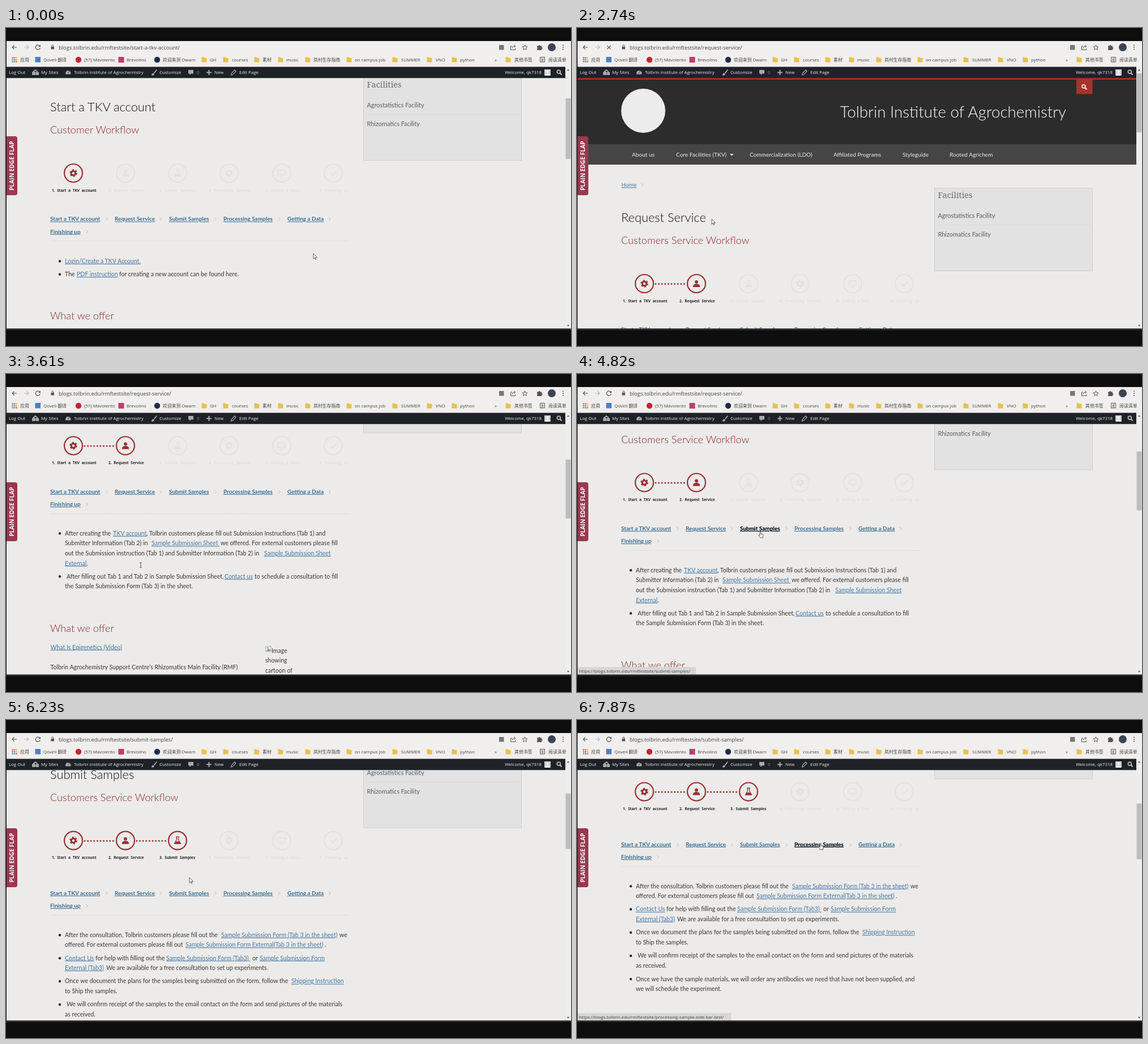
An HTML page for the animation above (8000 ms loop, 998 by 561 pixels).

```html
<!DOCTYPE html>
<html lang="en">
<head>
<meta charset="utf-8">
<title>Customer workflow</title>
<style>
@property --s { syntax: "<number>"; inherits: true; initial-value: 195; }
html, body { margin: 0; width: 100%; height: 100%; overflow: hidden; background: #0e0e0e; }
svg { display: block; width: 100vw; height: 100vh; animation: scroll 8s linear infinite; }
text { white-space: pre; font: 10.56px Lato, sans-serif; fill: #383838; }
.scroll { transform: translateY(calc(var(--s) * -1px)); }
.thumb { fill: #bdbdbd; transform: translateY(calc(var(--s) * var(--k) * 1px)); }
.title { font-size: 21.8px; font-weight: 300; fill: #111; }
.sub { font-size: 18.1px; font-weight: 300; fill: #8f2228; }
.link { fill: #4677a4; text-decoration: underline; text-decoration-thickness: .8px; }
.step { font-size: 10px; font-weight: 700; fill: #3a6c93; text-decoration: underline; }
.hover { fill: #111; }
.tiny { font: 700 6.5px "Open Sans", sans-serif; word-spacing: 2px; fill: #222; }
.serif { font: 14.5px "Noto Serif", serif; fill: #6c6c6c; }
.side { font-size: 10.9px; fill: #5c5c5c; }
.brand { font-size: 27.8px; font-weight: 300; fill: #fff; text-anchor: end; }
.nav { font-size: 10.1px; fill: #ececec; }
.crumb { font-size: 10px; }
.ui { font: 7.9px "Open Sans", "Noto Sans CJK SC", sans-serif; fill: #444; }
.url { font-size: 9.4px; }
.bar { fill: #ececec; }
.count { fill: #8d9194; }
.end { text-anchor: end; }
.tab { font: 700 10.2px "Open Sans", sans-serif; fill: #fff; text-anchor: middle; }
.line { fill: none; stroke: #555; stroke-width: 1.2; }
.red { fill: none; stroke: #982f33; }
#cursor { animation: move 8s ease-in-out infinite; }
@keyframes scroll {
  0% { --s: 195; animation-timing-function: step-end; }
  30.5% { --s: 0; }
  36.75% { --s: 0; }
  42.625%, 46.75% { --s: 324.5; }
  50.125% { --s: 259.5; animation-timing-function: step-end; }
  75.375% { --s: 0; animation-timing-function: step-end; }
  77.875% { --s: 238; }
  80.375% { --s: 305; }
  81.625%, 100% { --s: 324.5; }
}
@keyframes move {
  0%, 5% { transform: translate(543px, 398px); }
  15.125%, 50.125% { transform: translate(238px, 337px); }
  57.625%, 82.875% { transform: translate(324px, 278px); }
  91.75%, 100% { transform: translate(430px, 218px); }
}
</style>
</head>
<body>
<script>
const LOOP = 8000;
const css = [];

// Content visible only during the given [from, to] spans, in ms.
function during(spans, content) {
  const name = 'v' + css.length;
  const keys = spans.map(([a, b]) =>
    `${a * 100 / LOOP}%{opacity:1}` + (b < LOOP ? `${b * 100 / LOOP}%{opacity:0}` : '')).join('');
  const first = spans[0][0] ? '0%{opacity:0}' : '';
  const last = spans.at(-1)[1] < LOOP ? 0 : 1;
  css.push(`@keyframes ${name}{${first}${keys}100%{opacity:${last}}}`);
  return `<g style="animation:${name} ${LOOP}ms step-end infinite">${content}</g>`;
}

const text = (x, y, str, cls = '') => `<text x="${x}" y="${y}" class="${cls}">${str}</text>`;
const rect = (x, y, w, h, fill, more = '') =>
  `<rect x="${x}" y="${y}" width="${w}" height="${h}" fill="${fill}" ${more}/>`;
const dot = (x, y, r, fill) => `<circle cx="${x}" cy="${y}" r="${r}" fill="${fill}"/>`;
const path = (d, more = 'class="line"') => `<path d="${d}" ${more}/>`;
const thin = 'class="line" style="stroke-width:1"';
const at = (x, y, content) => `<g transform="translate(${x} ${y})">${content}</g>`;

// A line is a run of [x, string] pieces; a leading underscore marks a link.
const line = (y, ...runs) => runs.map(([x, s]) =>
  s[0] === '_' ? text(x, y, s.slice(1), 'link') : text(x, y, s)).join('');
const bullet = (y, ...runs) => dot(95, y - 3.4, 2.2, '#222') + line(y, ...runs);
const chevron = (x, y) => path(`M${x - 1.5} ${y - 3}l3 3l-3 3`, 'fill="none" stroke="#b5b5b5"');

const gear = '<circle r="3.7" class="red" stroke-width="3"/>' +
  '<circle r="5.6" class="red" stroke-width="2.4" stroke-dasharray="2.9 2.964"/>';
const person = dot(0, -3, 2.9, '#982f33') +
  path('M-6 6v-1.5c0-3 3-4 6-4s6 1 6 4V6z', 'fill="#982f33"');
const flask = path('M-3-6.5h6M-1.6-6.5v5L-5.5 5.5h11L1.6-1.5v-5', 'class="red" stroke-width="1.3"') +
  path('M-3.2 1.5h6.4l2.3 4h-11z', 'fill="#982f33"');
const screen = path('M-6-5h12v8h-12zM-3 6h6', 'class="red" stroke-width="1.5"');
const check = path('M-5 0l4 4l7-8', 'class="red" stroke-width="2"');

const STEPS = [
  [119, 81, '1. Start a TKV account', gear],
  [211, 181, '2. Request Service', person],
  [303, 271, '3. Submit Samples', flask],
  [394, 358, '4. Processing Samples', gear],
  [487, 458, '5. Getting a Data', screen],
  [578, 554, '6. Finishing up', check]
];

const workflow = done => STEPS.map(([cx, lx, label, icon], i) => {
  const ring = at(cx, 451, '<circle r="16" class="red" stroke-width="2.2"/>' + icon) +
    text(lx, 483.5, label, 'tiny');
  if (i >= done) return `<g opacity=".05" style="filter:grayscale(1)">${ring}</g>`;
  return ring + (i ? path(`M${cx - 72} 451.5h52`,
    'class="red" stroke-width="3" stroke-linecap="round" stroke-dasharray="0 5.6"') : '');
}).join('');

const LINKS = [[78, 'Start a TKV account'], [192, 'Request Service'], [288, 'Submit Samples'],
  [384, 'Processing Samples'], [497, 'Getting a Data']];

function steps(y, hot, span) {
  const row = LINKS.map(([x, s], i) => text(x, y, s, 'step') +
    (i === hot ? during([span], text(x, y, s, 'step hover')) : '')).join('');
  return row + [178, 273.5, 370, 483, 571.5].map(x => chevron(x, y - 3)).join('') +
    text(78, y + 22.2, 'Finishing up', 'step') + chevron(143, y + 19) +
    path(`M79 ${y + 35.5}H606`, 'stroke="#d0d0d0" stroke-dasharray="1 1"');
}

const header = rect(0, 88, 988, 117, '#2c2c2c') + rect(0, 205, 988, 36, '#454545') +
  rect(0, 88, 988, 3, '#a8322c') + rect(882, 91, 28.5, 25.5, '#a4342b') +
  path('M897.5 105.5l3 3', 'stroke="#fff" stroke-width="1.8"') +
  '<circle cx="895" cy="103" r="3" fill="none" stroke="#fff" stroke-width="1.5"/>' +
  dot(117, 146, 39, '#ececec') +
  text(864, 158, 'Tolbrin Institute of Agrochemistry', 'brand') +
  [[97, 'About us'], [175, 'Core Facilities (TKV)'], [305, 'Commercialization (LDO)'],
    [453, 'Affiliated Programs'], [575, 'Styleguide'], [658, 'Rooted Agrichem']]
    .map(([x, s]) => text(x, 227, s, 'nav')).join('') +
  path('M270 222h6.5l-3.25 3.6z', 'fill="#fff"') +
  text(78.5, 280.3, 'Home', 'link crumb') + chevron(115, 277);

const sidebar = rect(631.5, 282.5, 279, 146, '#e3e2e2', 'stroke="#cfcecf"') +
  text(637.5, 300, 'Facilities', 'serif') +
  text(637.5, 335, 'Agrostatistics Facility', 'side') +
  path('M638 347.5H905', 'stroke="#cbcbcb" stroke-dasharray="1 1"') +
  text(637.5, 368, 'Rhizomatics Facility', 'side');

function page(span, title, sub, done, linkY, hot, hotSpan, body, k, thumb) {
  return during([span], '<g class="scroll">' + header + sidebar +
    text(78, 342, title, 'title') + text(78, 381, sub, 'sub') + workflow(done) +
    steps(linkY, hot, hotSpan) + body + '</g>' +
    rect(988, 68, 10, 463, '#eeeeed') +
    `<rect class="thumb" x="988.5" y="80" width="9" height="${thumb}" style="--k:${k}"/>`);
}

const start =
  bullet(609.8, [104, '_Login/Create a TKV Account.']) +
  bullet(633, [104, 'The '], [125, '_PDF instruction'], [200, 'for creating a new account can be found here.']) +
  text(78, 709, 'What we offer', 'sub');

const request =
  bullet(609.2, [104, 'After creating the'], [189, '_TKV account'],
    [248, ', Tolbrin customers please fill out Submission Instructions (Tab 1) and']) +
  line(626.8, [104, 'Submitter Information (Tab 2) in'], [257, '_Sample Submission Sheet '],
    [379, 'we offered. For external customers please fill']) +
  line(644.4, [104, 'out the Submission instruction (Tab 1) and Submitter Information (Tab 2) in'],
    [456, '_Sample Submission Sheet']) +
  line(662, [104, '_External'], [142, '.']) +
  bullet(685.2, [107, 'After filling out Tab 1 and Tab 2 in Sample Submission Sheet,'],
    [386, '_Contact us'], [439, 'to schedule a consultation to fill']) +
  line(702.8, [104, 'the Sample Submission Form (Tab 3) in the sheet.']) +
  text(78, 779.5, 'What we offer', 'sub') +
  line(810, [78.5, '_What Is Epigenetics (Video)']) +
  line(845, [78.5, 'Tolbrin Agrochemistry Support Centre’s Rhizomatics Main Facility (RMF)']) +
  rect(459, 805, 9, 9, '#f5f5f5', 'stroke="#999" stroke-width=".8"') +
  path('M460 813l3-4l2 2l2-1v3z', 'fill="#5b9a5b"') + dot(462, 807.5, 1.2, '#6f9fd0') +
  line(816.2, [469, 'Image']) + line(833.8, [458, 'showing']) + line(851.2, [458, 'cartoon of']);

const submit =
  bullet(621.2, [104, 'After the consultation, Tolbrin customers please fill out the'],
    [380, '_Sample Submission Form (Tab 3 in the sheet)'], [589, 'we']) +
  line(638.6, [104, 'offered. For external customers please fill out'],
    [317, '_Sample Submission Form External(Tab 3 in the sheet)'], [563, '.']) +
  bullet(661.9, [104, '_Contact Us'], [158, 'for help with filling out the'],
    [283, '_Sample Submission Form (Tab3) '], [435, 'or'], [448, '_Sample Submission Form']) +
  line(679.3, [104, '_External (Tab3)'], [177, 'We are available for a free consultation to set up experiments.']) +
  bullet(702.8, [104, 'Once we document the plans for the samples being submitted on the form, follow the'],
    [504, '_Shipping Instruction']) +
  line(720.2, [104, 'to Ship the samples.']) +
  bullet(743.8, [107, 'We will confirm receipt of the samples to the email contact on the form and send pictures of the materials']) +
  line(761.2, [104, 'as received.']) +
  bullet(785, [104, 'Once we have the sample materials, we will order any antibodies we need that have not been supplied, and']) +
  line(802.4, [104, 'we will schedule the experiment.']);

const P1 = [0, 2440], P2 = [2440, 6030], P3 = [6030, LOOP];
const HOT1 = [1210, 2440], HOT2 = [4610, 6030], HOT3 = [7340, LOOP];
const SITE = 'blogs.tolbrin.edu/rmftestsite/';

const pages =
  page(P1, 'Start a TKV account', 'Customer Workflow', 1, 535.4, 1, HOT1, start, .226, 107) +
  page(P2, 'Request Service', 'Customers Service Workflow', 2, 535.4, 2, HOT2, request, .2185, 104) +
  page(P3, 'Submit Samples', 'Customers Service Workflow', 3, 547.2, 3, HOT3, submit, .208, 98);

const status = (span, slug, w) => during([span],
  rect(1, 517, w, 13, '#d6d6d5') + text(3.5, 526.6, `https://${SITE}${slug}/`, 'ui'));

const folder = x => path(`M${x - 4.5} 51.5h4l1 1.3h4v7.7h-9z`, 'fill="#e9c04d"');
const FOLDERS = [[350, 360, 'GH'], [388, 399, 'courses'], [443, 453, '素材'], [485, 495, 'music'],
  [533, 543, '岚村生存指南'], [606, 616, 'on campus job'], [687, 698, 'SUMMER'], [748, 759, 'VNO'],
  [792, 802, 'python'], [887, 898, '其他书签']];
const APPS = ['#d9534a', '#d9534a', '#e2b33c', '#4f9a5a', '#4a7fd0', '#e2b33c', '#4f9a5a', '#4a7fd0', '#d9534a'];

const toolbar = rect(0, 23, 998, 46, '#f0efee') +
  path('M19 34H11M14.5 30.5L11 34l3.5 3.5') +
  path('M32 34h8M36.5 30.5L40 34l-3.5 3.5', 'class="line" style="stroke:#bbb"') +
  during([[0, 2010], [2940, 5020], [6030, LOOP]],
    path('M59.8 32.2a4 4 0 1 0 .4 2.8') + path('M61 29.5v3.7h-3.7z', 'fill="#555"')) +
  during([[2010, 2940], [5020, 6030]], path('M53 30.8l6.5 6.5M59.5 30.8L53 37.3')) +
  rect(79.5, 33, 5.5, 4.5, '#555') + path('M80.8 33v-1.6a1.5 1.5 0 0 1 3 0V33', thin) +
  during([P1], text(93, 37.6, SITE + 'start-a-tkv-account/', 'ui url')) +
  during([P2], text(93, 37.6, SITE + 'request-service/', 'ui url')) +
  during([P3], text(93, 37.6, SITE + 'submit-samples/', 'ui url')) +
  rect(871, 30, 8.5, 8.5, '#777') +
  path('M894 32h-2.5v6.5h8v-2.5M894 36c0-3 2-4 5.5-4M897.5 29.8l2.5 2.2l-2.5 2.2', thin) +
  path('M916.5 29.8l1.3 3l3.2.3l-2.4 2.1l.7 3.2l-2.8-1.7l-2.8 1.7l.7-3.2l-2.4-2.1l3.2-.3z', thin) +
  path('M938 31.5h2.5a1.5 1.5 0 0 1 3 0h2.5v2.6a1.5 1.5 0 0 1 0 3v1.8h-8v-2.3a1.5 1.5 0 0 0 0-2.6z', 'fill="#555"') +
  dot(964, 34, 7, '#3b4354') + [30.5, 34, 37.5].map(y => dot(984, y, 1, '#555')).join('') +
  APPS.map((c, i) => rect(10.5 + i % 3 * 3.4, 51.5 + Math.floor(i / 3) * 3.4, 2.3, 2.3, c)).join('') +
  text(25, 59, '应用', 'ui') + rect(51.5, 51, 9.5, 9.5, '#4b7fc4') + text(66, 59, 'Qoveli 翻译', 'ui') +
  dot(128, 56, 5.2, '#c4232c') + text(138, 59, '(57) Mavolento', 'ui') +
  rect(198.5, 51, 10, 10, '#c23a72') + text(213, 59, 'Brevolino', 'ui') +
  dot(267, 56, 5.2, '#1d2b4d') + text(277, 59, '欢迎来到 Dwarn', 'ui') +
  FOLDERS.map(([x, tx, s]) => folder(x) + text(tx, 59, s, 'ui')).join('') +
  text(863, 58.6, '»', 'ui') +
  path('M943.5 51.5h8v8.5h-8zM945.5 54h4M945.5 56h4M945.5 58h4', thin) +
  text(958, 59, '阅读清单', 'ui');

const pale = 'fill="#a7abae"';
const admin = rect(0, 68.5, 988, 19.8, '#1e2226') +
  [[5, 'Log Out'], [62, 'My Sites'], [120, 'Tolbrin Institute of Agrochemistry'], [271, 'Customize'],
    [368, 'New'], [412, 'Edit Page']].map(([x, s]) => text(x, 81.4, s, 'ui bar')).join('') +
  text(337, 81.4, '0', 'ui count') +
  path('M46 83v-5l3-2.5l3 2.5v5zM52.5 83v-5l2.5-2l3 2.5V83zM48 76l4-3l4 3z', pale) +
  path('M105 82a5.2 5.2 0 1 1 9.6 0zM109 80l3-4', pale + ' stroke="#1e2226" stroke-width=".8"') +
  path('M257 83.5c0-3 1.5-4 3.5-4l1.5 1.5c0 2-2 3-5 2.5zM261 78.5l5-5.5l1 1l-4.5 6z', pale) +
  path('M322 74h9v6.5h-4l-2.5 2.5v-2.5H322z', pale) +
  path('M354 78.5h9M358.5 74v9', 'stroke="#a7abae" stroke-width="2"') +
  path('M397.5 83l.8-3l5.5-6l2.3 2.3l-5.7 6z', 'fill="none" stroke="#a7abae" stroke-width="1.2"') +
  text(946, 81.4, 'Welcome, qk7318', 'ui bar end') +
  rect(951, 73, 11, 11, '#cfcfcf') + dot(956.5, 77, 2.2, '#fff') + path('M952.5 84c0-5 8-5 8 0z', 'fill="#fff"') +
  '<circle cx="976.3" cy="77.3" r="3" fill="none" stroke="#c8cacc" stroke-width="1.5"/>' +
  path('M978.5 79.5l3 3', 'stroke="#c8cacc" stroke-width="1.8"');

const outline = 'fill="#fff" stroke="#333" stroke-width=".8"';
const arrow = path('M0 0v9.2l2.2-2l1.5 3.3l1.4-.7l-1.5-3.1h3z', outline);
const hand = path('M-1 0.8c0-1.3 1.8-1.3 1.8 0v3.4l3 .6c1 .2 1.3.8 1.2 1.6l-.6 4.4h-4.6l-3-4c-.4-1 .7-1.4 1.4-.8l.8.8z', outline);
const beam = path('M-1.8-4.2h3.6M0-4.2v8.4M-1.8 4.2h3.6', thin);
const cursor = '<g id="cursor">' +
  during([[0, 1210], [2440, 3210], [4010, 4610], [6030, 7340]], arrow) +
  during([HOT1, HOT2, HOT3], hand) + during([[3210, 4010]], beam) + '</g>';

const scene = rect(0, 23, 998, 508, '#ecebe9') + pages +
  path('M990.8 75.2h4.4l-2.2-2.6zM990.8 523.8h4.4l-2.2 2.6z', 'fill="#555"') +
  status(HOT1, 'request-service', 207) + status(HOT2, 'submit-samples', 209) +
  status(HOT3, 'processing-sample-side-bar-test', 271) +
  path('M0 191h16a4 4 0 0 1 4 4v96a4 4 0 0 1-4 4H0z', 'fill="#9a3850"') +
  '<text class="tab" transform="translate(13.6 243) rotate(-90)">PLAIN EDGE FLAP</text>' +
  toolbar + admin + rect(0, 23, 1, 508, '#0e0e0e') +
  rect(0, 0, 998, 23, '#0e0e0e') + rect(0, 530.3, 998, 31, '#0e0e0e') +
  rect(0, 530.3, 998, 2.5, '#2e2e2e') + cursor;

document.head.insertAdjacentHTML('beforeend', `<style>${css.join('\n')}</style>`);
document.body.insertAdjacentHTML('beforeend',
  `<svg viewBox="0 0 998 561" preserveAspectRatio="none">${scene}</svg>`);
</script>
</body>
</html>
```
